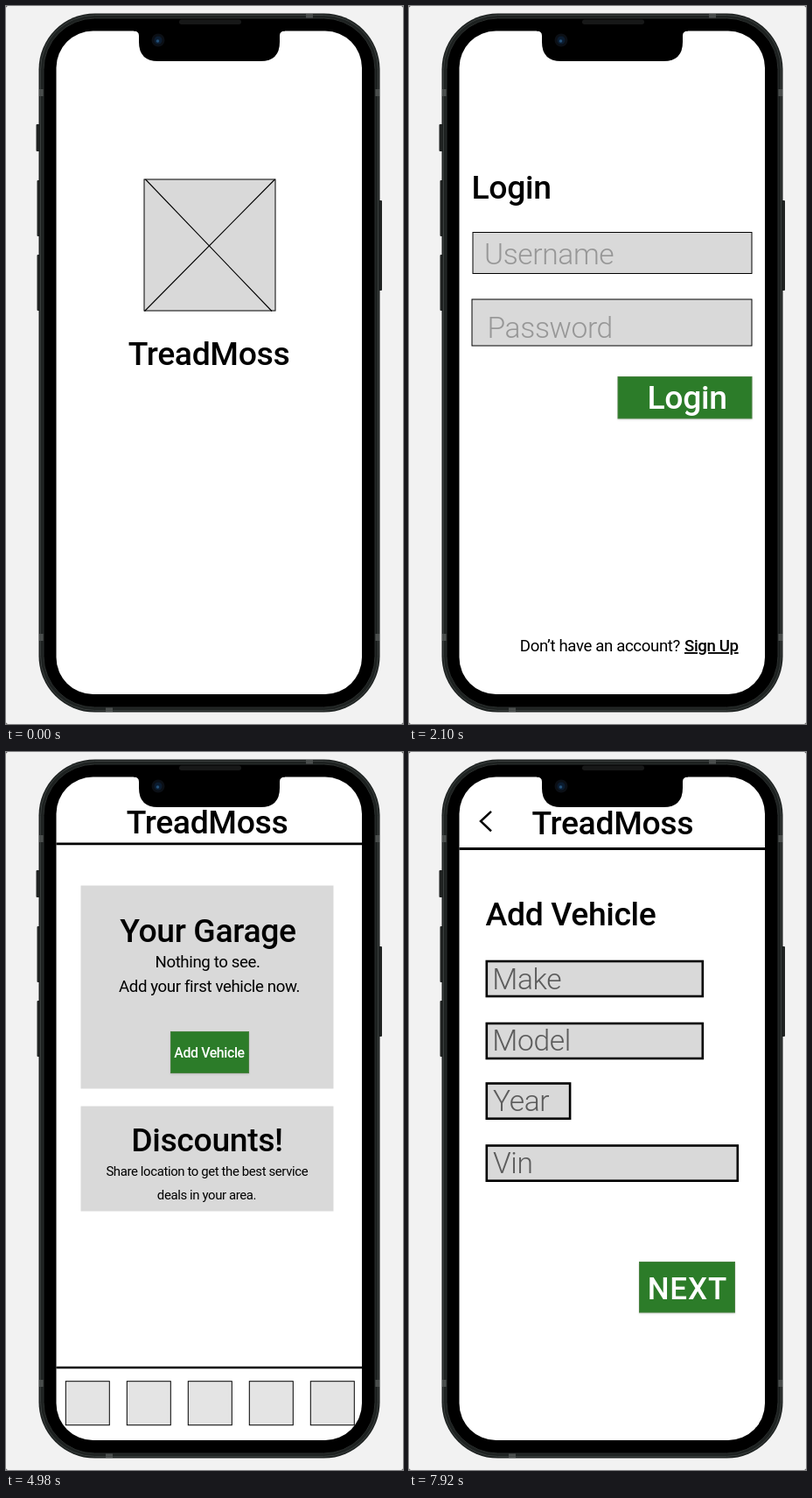
Animation of 454 by 820 pixels, one loop 8 s. Source, as an HTML page:

```html
<!DOCTYPE html>
<html lang="en">
<head>
<meta charset="utf-8">
<title>Car care app prototype</title>
<style>
  html, body { margin: 0; width: 100%; height: 100%; overflow: hidden; background: #f2f2f2; }
  svg { display: block; width: 454px; height: 820px; }
  text { font: 400 18.67px Roboto, sans-serif; letter-spacing: -.38px; }
  .title { font-size: 37.33px; font-weight: 500; }
  .hint { font-size: 33.6px; font-weight: 300; fill: #979797; }
  .dim { fill: #8c8c8c; }
  .dark .hint { fill: #5c5c5c; }
  .small { font-size: 14.93px; }
  .label { font-size: 15.87px; font-weight: 500; fill: #fff; }
  .mid { text-anchor: middle; }
  .white { fill: #fff; }
  .next { font-size: 35px; font-weight: 500; letter-spacing: .8px; fill: #fff; }
  .link { font-weight: 500; text-decoration: underline; }
  .box { fill: #d9d9d9; stroke: #000; }
  .dark .box { stroke-width: 2.6; }
  .card { fill: #d9d9d9; }
  .tab { fill: #e4e4e4; stroke: #000; }
  .btn { fill: #2c7c29; stroke: #47803f; filter: drop-shadow(0 1px 1px rgba(0, 0, 0, .15)); }

  /* hard cuts between screens */
  .screen { visibility: hidden; animation: 8s step-end infinite; }
  #splash { animation-name: splash; }
  #login { animation-name: login; }
  #signup { animation-name: signup; }
  #home { animation-name: home; }
  #add { animation-name: add; }
  @keyframes splash { 0% { visibility: visible } 6.25%, 100% { visibility: hidden } }
  @keyframes login { 0% { visibility: hidden } 6.25% { visibility: visible } 39.5%, 100% { visibility: hidden } }
  @keyframes signup { 0% { visibility: hidden } 39.5% { visibility: visible } 62.25%, 100% { visibility: hidden } }
  @keyframes home { 0% { visibility: hidden } 62.25% { visibility: visible } 99%, 100% { visibility: hidden } }
  @keyframes add { 0% { visibility: hidden } 99%, 100% { visibility: visible } }
</style>
</head>
<body>
<svg viewBox="0 0 454 820">
  <rect width="454" height="820" fill="#444"/>
  <rect width="454" height="820" rx="2.5" fill="#f2f2f2"/>

  <!-- phone body -->
  <g fill="#202322">
    <rect x="34.5" y="135" width="6" height="31" rx="1"/>
    <rect x="35.5" y="199" width="5" height="64" rx="1"/>
    <rect x="35.5" y="284" width="5" height="64" rx="1"/>
    <rect x="425" y="222" width="5" height="103" rx="1"/>
  </g>
  <rect x="37.5" y="8.5" width="390" height="798" rx="64" fill="#1d2120"/>
  <rect x="39.5" y="10.5" width="386" height="794" rx="62" fill="none" stroke="#3a3f3e"/>
  <path d="M343 9h8v5h-8zM114 800h8v6h-8zM38 95h6v8h-6zM421 95h6v8h-6zM38 717h6v8h-6zM421 717h6v8h-6z" fill="#4a4e4d"/>
  <rect x="43" y="14" width="379" height="787" rx="58.5" fill="#000" stroke="#2b2f2e"/>
  <rect x="57.5" y="28.5" width="349.5" height="757.5" rx="42" fill="#fff"/>

  <g id="splash" class="screen">
    <rect class="box" x="158" y="198" width="150" height="150"/>
    <path d="M159.500 198L304 348.500M307.500 198L158.500 348.500" stroke="#000" stroke-width="1.100"/>
    <text class="title mid" x="232" y="410">TreadMoss</text>
  </g>

  <g id="login" class="screen">
    <text class="title" x="71.500" y="219.700">Login</text>
    <rect class="box" x="73" y="258.500" width="319" height="47"/>
    <text class="hint" x="86" y="295">Username</text>
    <rect class="box" x="72" y="335" width="320" height="53"/>
    <text class="hint" x="89.500" y="378.500">Password</text>
    <rect class="btn" x="239" y="423.500" width="153" height="47.500"/>
    <text class="title white" x="272.500" y="460">Login</text>
    <text x="126.800" y="737">Don’t have an account?</text>
    <text class="link" x="315" y="737">Sign Up</text>
  </g>

  <g id="signup" class="screen">
    <text class="title mid" x="232.300" y="173.300">Create Account</text>
    <path d="M75 457.500H389" stroke="#bbb"/>
    <rect class="box" x="73" y="226.500" width="319" height="48"/>
    <rect class="box" x="73" y="302.500" width="319" height="47.500"/>
    <rect class="box" x="73" y="386" width="319" height="48"/>
    <rect class="box" x="73" y="459" width="319" height="47.500"/>
    <text class="hint dim" x="86.500" y="262.500">Full Name</text>
    <text class="hint dim" x="86.500" y="338">Email</text>
    <text class="hint dim" x="86.500" y="419">Create Password</text>
    <text class="hint dim" x="86.500" y="492.500">Confirm Password</text>
    <rect class="btn" x="303.500" y="535.500" width="88.500" height="47.500"/>
    <text class="label mid" x="350" y="565">Sign Up</text>
  </g>

  <g id="home" class="screen">
    <text class="title mid" x="230" y="92.800">TreadMoss</text>
    <path d="M57.500 104.900H407M57.500 703H407" stroke="#000" stroke-width="2.600"/>
    <rect class="card" x="85.500" y="152.500" width="289" height="232"/>
    <text class="title mid" x="231" y="216.900">Your Garage</text>
    <text class="mid" x="230.500" y="246.400">Nothing to see.</text>
    <text class="mid" x="232.500" y="273.700">Add your first vehicle now.</text>
    <rect class="btn" x="188.500" y="319.500" width="89" height="47"/>
    <text class="label mid" x="232.500" y="349.300">Add Vehicle</text>
    <rect class="card" x="85.500" y="404.500" width="289" height="120"/>
    <text class="title mid" x="230" y="455.500">Discounts!</text>
    <text class="small mid" x="229.800" y="484">Share location to get the best service</text>
    <text class="small mid" x="229.500" y="510.500">deals in your area.</text>
    <rect class="tab" x="68.300" y="718.700" width="50" height="50"/>
    <rect class="tab" x="138.300" y="718.700" width="50" height="50"/>
    <rect class="tab" x="208.300" y="718.700" width="50" height="50"/>
    <rect class="tab" x="278.300" y="718.700" width="50" height="50"/>
    <rect class="tab" x="348.300" y="718.700" width="50" height="50"/>
  </g>

  <g id="add" class="screen dark">
    <path d="M94 67.800L82 79L94 90.300" fill="none" stroke="#000" stroke-width="2.500"/>
    <text class="title mid" x="232.800" y="94">TreadMoss</text>
    <path d="M57.500 110.500H407" stroke="#000" stroke-width="3"/>
    <text class="title" x="87.500" y="198.100">Add Vehicle</text>
    <rect class="box" x="88.800" y="239" width="247" height="40"/>
    <rect class="box" x="88.800" y="310" width="247" height="40"/>
    <rect class="box" x="88.800" y="378.500" width="95.300" height="40.200"/>
    <rect class="box" x="88.800" y="449.500" width="287" height="40.200"/>
    <text class="hint" x="95.300" y="270.600">Make</text>
    <text class="hint" x="95.300" y="341.300">Model</text>
    <text class="hint" x="96" y="410">Year</text>
    <text class="hint" x="96" y="481">Vin</text>
    <rect class="btn" x="263.500" y="582.500" width="109" height="57.500"/>
    <text class="next" x="272.700" y="624.500">NEXT</text>
  </g>

  <!-- notch, camera and speaker -->
  <path d="M146 27V28.500Q152 28.500 152 34V41Q152 63 174 63H291Q313 63 313 41V34Q313 28.500 319 28.500V27Z"/>
  <circle cx="174" cy="39" r="7.500" fill="#0b0f15"/>
  <circle cx="174" cy="39" r="4.500" fill="#0b1c30"/>
  <circle cx="173.500" cy="40" r="1.800" fill="#245078"/>
  <rect x="198" y="15.500" width="71" height="5.500" rx="2.700" fill="#171818"/>
</svg>
</body>
</html>
```
